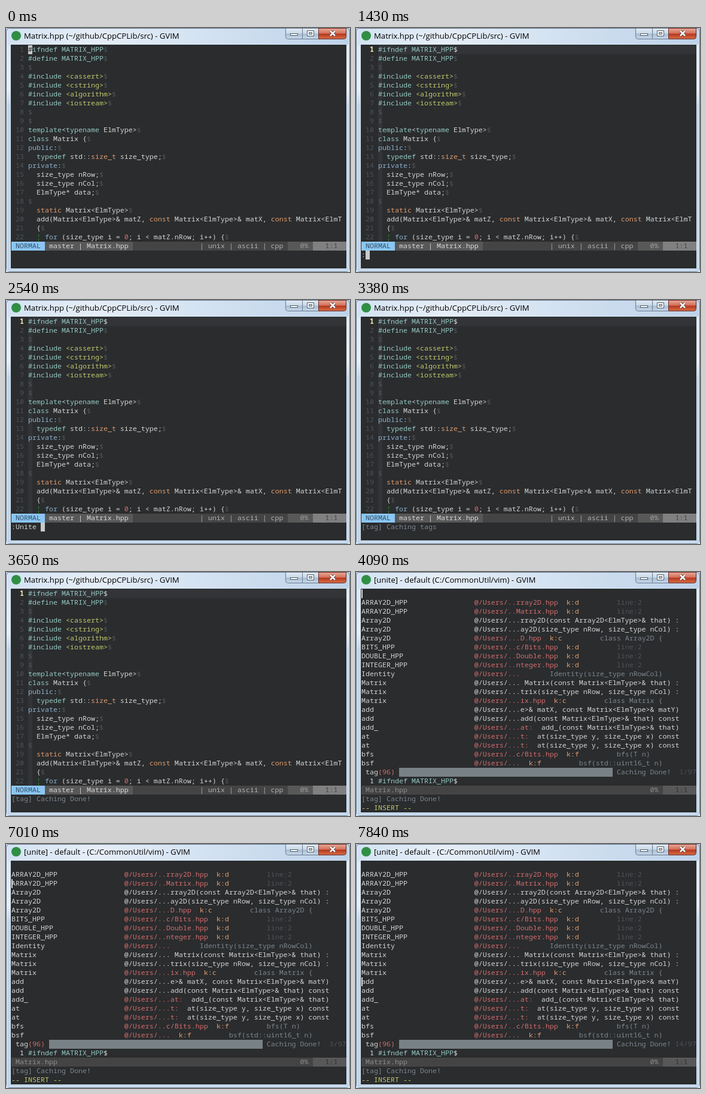
These frames come from a looping animation (575 px wide and 410 px high, 7990 ms). An HTML page:

```html
<!DOCTYPE html>
<html lang="en">
<head>
<meta charset="utf-8">
<title>Editor session</title>
<style>
  html, body { margin: 0; width: 100%; height: 100%; overflow: hidden; }
  body { position: relative; background: #c4d8ed; }
  #frame { position: absolute; left: 0; top: 0; }
  #title { position: absolute; left: 30px; top: 4px; white-space: pre; color: #000;
    font: 13.13px/18px "Open Sans", "Noto Sans", sans-serif; }
  #client { position: absolute; left: 8px; top: 28px; width: 561px; height: 376px;
    overflow: hidden; background: #2a2c2e; color: #d4d6d3;
    font: 11.667px/13px "Noto Sans Mono", "DejaVu Sans Mono", monospace; }
  .view { position: absolute; left: 1px; top: 1px; }
  .row { height: 15px; white-space: pre; }
  i { font-style: normal; }
  .a { color: #95c9c3; }
  .b { color: #8cafcb; }
  .g { color: #c2c86c; }
  .o { color: #e09c6c; }
  .r { color: #d26c6c; }
  .c { color: #7d858c; }
  .d, .k, .e { color: #4e5257; }
  .t { color: #2f9e3a; }
  .w { color: #e4e6e4; }
  .N, .S, .M, .P, .R, .I, .J, .G { display: inline-block; height: 15px; vertical-align: top; }
  .N { background: #8ac6f2; color: #34506a; }
  .S { background: #585858; color: #d8d8d8; }
  .M { background: #444; color: #b0b0b0; }
  .P { background: #585858; color: #9c9c9c; }
  .R { background: #808080; color: #444; }
  .I { background: #444; color: #8c8c8c; }
  .J { background: #585858; color: #2f2f2f; }
  .G { background: #788186; }
  .box { position: absolute; }
  .tint { background: #323437; }
  .hold .k { color: #f0e4b0; font-weight: bold; }
  .hold .e { color: #d4d6d3; }
  #block { width: 7px; height: 15px; background: #c8cbc9; color: #2a2c2e; }
  #bar { left: 1px; width: 2px; height: 15px; background: #d4d7d5; }
  [hidden] { display: none; }
</style>
</head>
<body>
<svg id="frame" width="575" height="410">
  <defs>
    <linearGradient id="glass" x2="1" y2="0">
      <stop offset="0" stop-color="#d3e2f2"/><stop offset=".25" stop-color="#e6eef7"/>
      <stop offset=".55" stop-color="#d5e3f2"/><stop offset="1" stop-color="#bdd2e9"/>
    </linearGradient>
    <linearGradient id="side" x2="0" y2="1">
      <stop offset="0" stop-color="#d8e5f3"/><stop offset=".25" stop-color="#e6eff8"/>
      <stop offset=".32" stop-color="#c0d5ec"/><stop offset="1" stop-color="#c0d5ec"/>
    </linearGradient>
    <linearGradient id="pale" x2="0" y2="1">
      <stop offset="0" stop-color="#e3ecf6"/><stop offset=".48" stop-color="#c9d8e8"/>
      <stop offset=".52" stop-color="#a9bdd2"/><stop offset="1" stop-color="#c6d8ea"/>
    </linearGradient>
    <linearGradient id="red" x2="0" y2="1">
      <stop offset="0" stop-color="#e9a998"/><stop offset=".48" stop-color="#d2705a"/>
      <stop offset=".52" stop-color="#b8351c"/><stop offset="1" stop-color="#d4704a"/>
    </linearGradient>
  </defs>
  <rect x=".5" y=".5" width="574" height="409" rx="5" fill="url(#side)" stroke="#5a6b7d"/>
  <rect x="1.5" y="1.5" width="572" height="27" rx="4" fill="url(#glass)"/>
  <path d="M1.5 6V408.5H573.5V6" fill="none" stroke="#e6f0fa"/>
  <rect x="7.5" y="27.5" width="562" height="377" fill="none" stroke="#dce8f4"/>
  <circle cx="17" cy="13" r="8" fill="#2f8f45"/>
  <g stroke="#66788c">
    <path d="M467.5 .5H495.5V18.5H471.5Q467.5 18.5 467.5 14.5Z" fill="url(#pale)"/>
    <path d="M495.5 .5H522.5V18.5H495.5Z" fill="url(#pale)"/>
    <path d="M522.5 .5H568.5V14.5Q568.5 18.5 564.5 18.5H522.5Z" fill="url(#red)" stroke="#6b2a24"/>
  </g>
  <rect x="475.5" y="9.5" width="12" height="3" fill="#fff" stroke="#535a66"/>
  <path d="M503.5 4.5H514.5V13.5H503.5ZM506.5 7.5H511.5V10.5H506.5Z" fill="#fff" fill-rule="evenodd" stroke="#535a66"/>
  <path d="M542 5L550 13M550 5L542 13" stroke="#5c3a3a" stroke-width="4.5"/>
  <path d="M542 5L550 13M550 5L542 13" stroke="#fff" stroke-width="2.6"/>
</svg>
<div id="title"></div>
<div id="client">
  <div id="tints">
    <div class="box tint" style="left:29px;top:1px;width:532px;height:15px"></div>
    <div class="box tint" style="left:29px;top:1px;width:7px;height:330px"></div>
  </div>
  <div id="listTint" class="box tint" style="left:1px;top:16px;width:7px;height:180px"></div>
  <div id="code" class="view"></div>
  <div id="list" class="view"></div>
  <div id="foot" class="view" style="top:346px"></div>
  <div id="block" class="box"></div>
  <div id="bar" class="box"></div>
</div>
<script>
const LOOP = 7990;
const $ = id => document.getElementById(id);

// ‹x…› wraps text in the colour class x
const paint = s => s.replace(/&/g, '&amp;').replace(/</g, '&lt;')
  .replace(/‹(\w)([^›]*)›/g, '<i class="$1">$2</i>');
const rows = lines => lines.map(s => `<div class="row">${paint(s)}</div>`).join('');

const source = [
  '‹a#ifndef MATRIX_HPP›', '‹a#define MATRIX_HPP›', '',
  ...['cassert', 'cstring', 'algorithm', 'iostream'].map(h => `‹a#include› ‹g<${h}>›`),
  '', '',
  '‹atemplate›<‹atypename› ElmType>',
  '‹aclass› Matrix {',
  '‹bpublic›:',
  '  ‹atypedef› std::‹osize_t› size_type;',
  '‹bprivate›:',
  '  size_type nRow;',
  '  size_type nCol;',
  '  ElmType* data;',
  '',
  '  ‹ostatic› Matrix<ElmType>',
  '  add(Matrix<ElmType>& matZ, ‹oconst› Matrix<ElmType>& matX, ‹oconst› Matrix<ElmT',
  '  {',
  '  ‹t¦› ‹bfor› (size_type i = ‹r0›; i < matZ.nRow; i++) {'
];
const numbered = source.map((s, i) => {
  const eol = i === 19 ? '' : i ? '‹d$›' : '‹e$›';
  return `‹${i ? 'd' : 'k'}${String(i + 1).padStart(3)}› ${s}${eol}`;
});
const status = '‹N NORMAL ›‹S master | Matrix.hpp ›‹M' + ' '.repeat(16) +
  '| unix | ascii | cpp ›‹P   0% ›‹R   1:1  ›';
$('code').innerHTML = rows([...numbered, status]);

const path = '@/Users/';
const gap = ' '.repeat(9);
const plain = s => `${path}...${s}`;
const guard = f => `‹r${path}..${f}›  ‹ok:d›${gap}‹dline:2›`;
const kind = (f, k, s) => `‹r${path}${f}›  ‹ok:${k}›${gap}‹c${s}›`;
const tail = (f, s) => `‹r${path}...${f}›  ${s}`;
const at = tail('t:', 'at(size_type y, size_type x) const');
const tags = [
  ['ARRAY2D_HPP', guard('rray2D.hpp')],
  ['ARRAY2D_HPP', guard('Matrix.hpp')],
  ['Array2D', plain('rray2D(const Array2D<ElmType>& that) :')],
  ['Array2D', plain('ay2D(size_type nRow, size_type nCol) :')],
  ['Array2D', kind('...D.hpp', 'c', 'class Array2D {')],
  ['BITS_HPP', guard('c/Bits.hpp')],
  ['DOUBLE_HPP', guard('Double.hpp')],
  ['INTEGER_HPP', guard('nteger.hpp')],
  ['Identity', `‹r${path}...›       ‹cIdentity(size_type nRowCol)›`],
  ['Matrix', plain(' Matrix(const Matrix<ElmType>& that) :')],
  ['Matrix', plain('trix(size_type nRow, size_type nCol) :')],
  ['Matrix', kind('...ix.hpp', 'c', 'class Matrix {')],
  ['add', plain('e>& matX, const Matrix<ElmType>& matY)')],
  ['add', plain('add(const Matrix<ElmType>& that) const')],
  ['add_', tail('at:', 'add_(const Matrix<ElmType>& that)')],
  ['at', at],
  ['at', at],
  ['bfs', kind('..c/Bits.hpp', 'f', 'bfs(T n)')],
  ['bsf', kind('...', 'f', 'bsf(std::uint16_t n)')]
];
const listRows = n => rows([
  '',
  ...tags.map(([name, rest]) => name.padEnd(27) + rest),
  ` tag‹r(96)› ‹G${' '.repeat(51)}› ‹cCaching Done!› ‹d${String(n).padStart(2)}/97›`,
  '  ‹w1› ‹a#ifndef MATRIX_HPP›$',
  `‹I${' Matrix.hpp'.padEnd(69)}0% ›‹J   1:1  ›`
]);

const typed = [
  [0, ''], [1430, ':'], [1700, ':U'], [2000, ':Un'], [2120, ':Unit'], [2240, ':Unite'],
  [2540, ':Unite '], [2820, ':Unite ta'], [3100, ':Unite tag'],
  [3380, '‹c[tag] Caching tags›'], [3530, '‹c[tag] Caching tags ...›'],
  [3650, '‹c[tag] Caching Done!›']
];
const picks = [[0, 1], [7010, 3], [7440, 6], [7590, 9], [7715, 11], [7840, 14]];
const latest = (steps, t) => steps.filter(s => s[0] <= t).pop()[1];

function put(id, html) {
  const el = $(id);
  if (el.shown !== html) el.innerHTML = el.shown = html;
}
function place(el, x, y) {
  el.style.left = x + 'px';
  el.style.top = y + 'px';
}

function draw(t) {
  const listing = t >= 4090;
  const typing = t >= 1430 && t < 3380;
  const line = latest(typed, t);
  const pick = latest(picks, t);

  $('code').hidden = listing;
  $('list').hidden = $('bar').hidden = !listing;
  $('code').classList.toggle('hold', t >= 710);
  $('tints').hidden = t < 710 || listing;
  $('listTint').hidden = t < 5640 || t >= 7010;

  put('title', !listing ? 'Matrix.hpp (~/github/CppCPLib/src) - GVIM'
    : `[unite] - default ${t < 7010 ? '' : '- '}(C:/CommonUtil/vim) - GVIM`);
  put('list', listRows(pick));
  put('foot', rows([line, listing ? '‹g-- INSERT --›' : '']));

  $('block').hidden = t >= 3380;
  put('block', typing ? '' : '#');
  if (typing) place($('block'), 1 + 7 * line.length, 346);
  else place($('block'), 29, 1);
  $('bar').style.top = 1 + 15 * (pick - 1) + 'px';
}

function tick() {
  draw(performance.now() % LOOP);
  requestAnimationFrame(tick);
}
tick();
</script>
</body>
</html>
```
